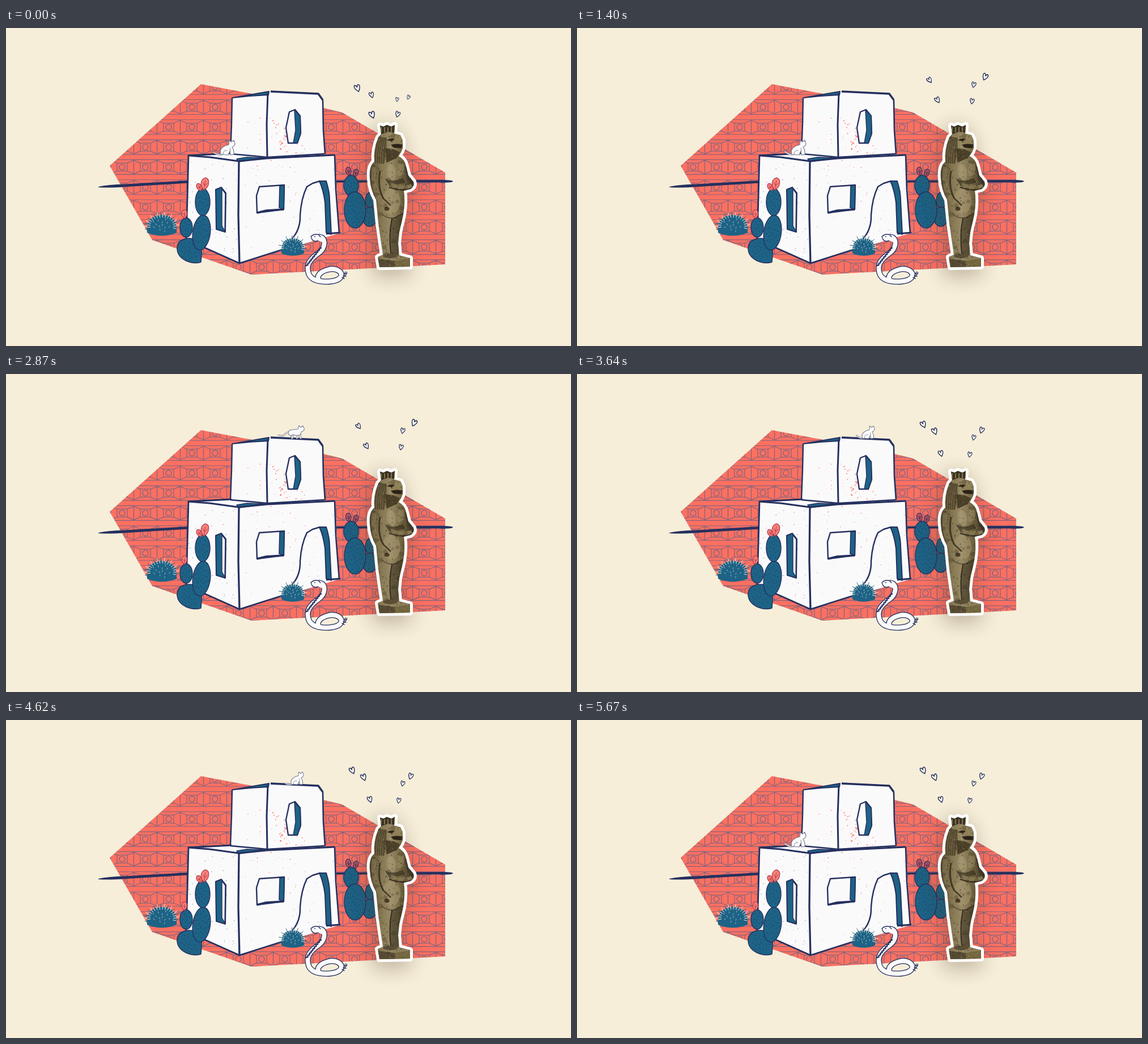
Recreate the animation shown at these times as an HTML page with a canvas. Size 997 by 561 pixels, loop 5740 ms.

```html
<!DOCTYPE html>
<html lang="en">
<head>
<meta charset="utf-8">
<title>House with cat</title>
<style>
html, body { margin: 0; width: 100%; height: 100%; overflow: hidden; background: #f6eed9; }
canvas { display: block; width: 997px; height: 561px; }
</style>
</head>
<body>
<canvas id="stage" width="997" height="561"></canvas>
<script>
const W = 997, H = 561, LOOP = 5740, STEP = 70;
const CREAM = '#f6eed9', CORAL = '#fb7061', NAVY = '#25305f', TEAL = '#1d6386', WHITE = '#fbfafb';
const TAU = Math.PI * 2;
const view = document.getElementById('stage').getContext('2d');
const backdrop = document.createElement('canvas');
backdrop.width = W;
backdrop.height = H;
let g = backdrop.getContext('2d');

let seed = 7;
const rand = () => (seed = (seed * 16807) % 2147483647) / 2147483647;
const between = (a, b) => a + (b - a) * rand();

function shape(d, fill, stroke, width = 1) {
  const path = d instanceof Path2D ? d : new Path2D(d);
  if (fill) { g.fillStyle = fill; g.fill(path); }
  if (stroke) { g.strokeStyle = stroke; g.lineWidth = width; g.stroke(path); }
}
const line = (d, width, color = NAVY) => shape(d, null, color, width);

function oval(x, y, rx, ry, fill, stroke, width, turn = 0) {
  const path = new Path2D();
  path.ellipse(x, y, rx, ry, turn, 0, TAU);
  shape(path, fill, stroke, width);
}

function clipped(d, draw) {
  g.save();
  g.clip(new Path2D(d));
  draw();
  g.restore();
}

function specks(count, x0, y0, x1, y1, color, size) {
  for (let i = 0; i < count; i++) {
    const r = between(0.25, size);
    oval(between(x0, x1), between(y0, y1), r, r, color);
  }
}

function drawPattern() {
  const land = 'M344 99 L460 121 L560 141 L593 149 L775 255 V417 L433 435 L258 374 L183 243 Z';
  shape(land, CORAL);
  clipped(land, () => {
    const ink = 'rgba(74,94,138,.66)';
    for (let row = -1; row < 10; row++) {
      const y = 139.5 + row * 35.3;
      line(`M180 ${y - 13}H780M180 ${y + 13}H780`, 1.1, ink);
      for (let x = 328 - 41 * 4; x < 800; x += 41) {
        line(`M${x - 9} ${y - 7}H${x + 9}V${y + 7}H${x - 9}Z
          M${x + 9} ${y - 7}L${x + 20.5} ${y - 12}L${x + 32} ${y - 7}
          M${x + 9} ${y + 7}L${x + 20.5} ${y + 12}L${x + 32} ${y + 7}
          M${x + 20.5} ${y - 12}V${y + 12}`, 1.25, ink);
        oval(x, y, 5, 5, null, ink, 1.4);
      }
    }
  });
}

function drawHorizon() {
  shape('M163 280 Q180 276 210 275.5 L330 268.5 V273 L215 280 Q180 282.5 163 281 Z', NAVY);
  shape('M575 269 L770 268 Q788 268 789 270.5 Q786 273.5 765 272.5 L575 272.5 Z', NAVY);
}

function drawHouse() {
  const lower = 'M322 225 L398 221 L580 224 L588 362 L412 415 L318 373 Z';
  const upper = 'M399 123 L467 112 L551 116 L559 127 L562 223 L461 229 L396 222 Z';
  shape(lower, WHITE);
  shape(upper, WHITE);
  clipped(lower, () => {
    specks(110, 318, 235, 411, 410, 'rgba(37,48,95,.55)', 0.8);
    specks(60, 415, 240, 585, 400, 'rgba(90,60,95,.5)', 0.75);
    specks(18, 440, 230, 530, 360, CORAL, 0.9);
  });
  specks(60, 466, 150, 528, 225, CORAL, 1);
  specks(18, 484, 190, 497, 221, CORAL, 1.5);
  specks(14, 425, 150, 460, 215, CORAL, 0.8);

  shape('M400 123 L464 112 L463 118 L430 120 Z', TEAL, NAVY, 2);
  line('M467 112 L551 116 L559 127', 3.6);
  line('M559 127 L560 180 L563 222', 2.6);
  line('M399 123 L398 170 L396 222', 2.4);
  line('M462 115 L460 170 L461 227', 3);
  line('M396 222 L430 225 L461 228 L562 222', 2.6);

  shape('M407 231 L425 228 L457 229 L411 236 Z', TEAL, NAVY, 1.5);
  line('M398 221 L322 225 L360 228 L411 235 L460 230 L520 227 L580 224', 3);
  line('M411 235 L410 330 L412 415', 3.3);
  line('M322 225 L320 300 L318 373 L412 415 L500 387', 2.8);
  line('M580 224 L582 285 L588 362', 2.6);

  shape('M370 285 L380 281 L388 291 L387 360 L371 355 Z', TEAL, NAVY, 2);
  shape('M381 284 L387 292 L386 358 L381 349 Z', WHITE, NAVY, 1.4);
  shape('M447 280 L491 277 L490 320 L443 326 L442 296 Z', WHITE, NAVY, 2.4);
  shape('M483 279 L491 277 L490 320 L482 317 Z', TEAL, NAVY, 1.6);
  line('M443 326 L459 322 L490 320', 3.4);
  shape('M500 148 L510 144 L519 155 L520 186 L514 203 L498 203 L494 176 Z', WHITE, NAVY, 2.3);
  shape('M509 145 L519 155 L520 186 L514 203 L507 203 L511 180 Z', TEAL, NAVY, 1.4);
  line('M504 373 Q520 355 519 330 Q521 300 531 280 L541 274 L554 270', 2.5);
  shape('M553 270 L565 270 Q571 289 571 303 L574 364 L565 361 L563 308 Q560 285 553 270 Z', TEAL, NAVY, 2);
  line('M565 363 L590 361', 3);
}

function prickles(x, y, rx, ry) {
  const count = rx * ry / 18;
  for (let i = 0; i < count; i++) {
    const a = i * 2.4, r = Math.sqrt(i / count) * 0.85;
    line(`M${x + Math.cos(a) * rx * r} ${y + Math.sin(a) * ry * r}l1 2`, 0.9);
  }
}

function paddle(x, y, rx, ry, turn = 0) {
  oval(x, y, rx, ry, TEAL, NAVY, 1.4, turn);
  prickles(x, y, rx, ry);
}

function petal(x, y, s, turn, fill = '#fb8277', stroke = '#a8354c') {
  g.save();
  g.translate(x, y);
  g.rotate(turn);
  g.scale(s, s);
  shape('M0 0 C-9 -6 -10 -17 -2 -22 C7 -22 9 -8 0 0 Z', fill, stroke, 1.1 / s);
  line('M0 -2 L-1 -17 M0 -8 L4 -14 M0 -8 L-5 -13', 0.8 / s, stroke);
  g.restore();
}

function urchin(x, y, rx, ry) {
  const body = `M${x - rx} ${y + ry * .65} Q${x - rx * 1.1} ${y - ry} ${x} ${y - ry} Q${x + rx * 1.1} ${y - ry} ${x + rx} ${y + ry * .65} Q${x} ${y + ry * 1.2} ${x - rx} ${y + ry * .65} Z`;
  shape(body, TEAL);
  for (let i = 0; i < 34; i++) {
    const a = Math.PI * (0.92 + 1.16 * i / 33);
    const dx = Math.cos(a), dy = Math.sin(a), r = i % 2 ? 0.78 : 0.98;
    line(`M${x + dx * rx * r} ${y + dy * ry * r}l${dx * 5.5} ${dy * 5.5}`, 1, i % 4 ? '#f7f0e4' : TEAL);
  }
  for (let i = 0; i < 13; i++) {
    const a = i * 2.4, r = 0.65 * Math.sqrt(i / 13);
    line(`M${x + Math.cos(a) * rx * r} ${y + Math.sin(a) * ry * r}l${Math.cos(a) * 2} -3`, 0.8, 'rgba(247,240,228,.75)');
  }
}

function drawPlants() {
  urchin(275, 349, 26, 19);
  shape('M302 390 C301 373 320 368 334 373 C349 379 345 400 344 413 C328 418 303 409 302 390 Z', TEAL, NAVY, 1.4);
  prickles(324, 392, 19, 21);
  paddle(318, 352, 11, 17);
  paddle(345, 361, 15.5, 31, 0.13);
  paddle(347, 307, 13, 24);
  petal(345, 287, 0.65, -0.5);
  petal(349, 286, 1, 0.22);
  petal(315, 336, 0.7, 0.05);

  petal(606, 261, 0.72, -0.15, '#c45561', NAVY);
  petal(615, 263, 0.66, 0.35, '#c45561', NAVY);
  paddle(643, 304, 9, 14);
  paddle(642, 333, 13, 17);
  paddle(609, 278, 13, 18);
  paddle(616, 321, 19, 32);
  urchin(506, 387, 20, 16);
}

function drawSnake() {
  oval(566, 436, 17, 8, CREAM);
  const tail = 'M584 442 Q594 441 600 432';
  const coil = 'M546 370 C565 363 566 386 553 396 C536 408 529 417 534 433 C540 451 575 449 585 444 C601 436 586 421 569 426 C556 429 549 436 551 442';
  g.lineCap = 'round';
  line(tail, 4.5);
  line(tail, 2.2, WHITE);
  line(coil, 10.5);
  line(coil, 7.8, WHITE);
  line('M593 440l4 2M595 437l5 1M597 434l4 -1', 1.4);
  shape('M538 368 Q544 362 552 365 Q558 371 552 374 Q545 379 540 373 Z', WHITE, NAVY, 1.3);
  shape('M548 367 L558 370 V378 L547 373 Z', WHITE);
  oval(545, 368, 0.9, 0.9, NAVY);
  for (let i = 0; i < 9; i++) {
    const x = 556 - i * 2.9, y = 388 + i * 3.7;
    line(`M${x} ${y}l-3.4 1.6`, 2.4);
  }
  g.lineCap = 'butt';
}

function drawStatue() {
  const body = new Path2D('M660 172 L666 174 L672 171 L680 174 L686 171 L685 186 L696 189 L700 198 L700 212 Q698 219 693 226 Q704 232 706 244 L710 260 L719 271 Q722 279 714 284 L702 287 Q705 305 701 330 L694 360 L692 380 L694 401 L713 406 V421 L659 422 L656 404 L665 400 L662 380 L657 345 L653 303 Q643 286 642 266 Q640 243 650 236 Q648 214 657 193 L662 187 Z');
  g.save();
  g.shadowColor = 'rgba(75,60,40,.3)';
  g.shadowBlur = 34;
  g.shadowOffsetX = -5;
  g.shadowOffsetY = 9;
  shape(body, '#fff', '#fff', 10);
  g.restore();

  const tone = g.createLinearGradient(642, 0, 716, 0);
  ['#4c432f', '#83754f', '#988a66', '#71643f', '#40372a'].forEach((c, i) => tone.addColorStop(i / 4, c));
  g.save();
  g.clip(body);
  g.fillStyle = tone;
  g.fillRect(630, 165, 95, 262);

  // crown, mane and snout
  shape('M655 165 H690 V186 L674 183 L657 189 Z', '#3a3222');
  for (let x = 662; x < 687; x += 6) line(`M${x} 175 V184`, 2, '#83754f');
  shape('M657 191 Q647 215 649 238 L667 240 Q674 220 671 194 Z', '#695c3d');
  for (let i = 0; i < 5; i++) line(`M${659 + i * 3} 193 Q${650 + i * 4} 215 ${652 + i * 3.6} 239`, 0.8, '#392f1f');
  shape('M673 192 Q684 187 696 190 L701 199 L698 205 L680 203 Z', '#8f8058');
  shape('M672 198 Q679 193 686 196 L681 200 Z', '#2e2618');
  shape('M679 206 Q690 203 701 206 L697 212 L684 211 Z', '#2b2217');
  shape('M670 212 L684 214 L695 219 L690 229 L671 238 Z', '#4b4029');

  // torso and arms
  oval(680, 254, 8, 14, 'rgba(174,160,118,.5)', null, 1, -0.2);
  oval(696, 250, 6, 12, 'rgba(165,149,108,.45)', null, 1, 0.2);
  shape('M668 265 Q684 274 700 264 L704 273 L677 279 Z', 'rgba(48,39,24,.6)');
  oval(680, 306, 16, 22, 'rgba(170,155,116,.45)');
  line('M660 252 Q655 282 666 301 L679 313', 3, 'rgba(45,36,23,.75)');
  line('M650 246 Q646 276 658 302 L672 317', 8, 'rgba(137,121,82,.6)');
  line('M705 244 L709 264 L716 274', 2.2, '#3e3424');
  line('M716 278 Q702 285 679 276', 6, '#83754f');
  line('M715 284 Q701 289 676 281', 2, 'rgba(40,32,20,.85)');
  oval(672, 319, 4.5, 3.5, '#4c3b27');

  // legs and plinth
  line('M663 328 Q680 343 700 327', 1.4, 'rgba(56,46,29,.7)');
  shape('M682 336 L701 325 L692 401 L679 399 Q675 365 682 336 Z', 'rgba(46,38,24,.5)');
  line('M681 336 Q675 365 679 398', 2, '#362d1f');
  shape('M655 402 L679 399 L714 406 L690 411 Z', '#8e7f5a');
  oval(678, 402, 13, 4, '#5b4f38');
  shape('M656 407 L686 411 V424 H655 Z', '#574b34');
  shape('M686 411 L715 406 V424 H686 Z', '#74673f');

  specks(45, 642, 190, 718, 420, 'rgba(48,39,25,.26)', 5);
  specks(260, 642, 188, 720, 422, 'rgba(37,30,20,.62)', 1.15);
  specks(140, 645, 190, 716, 420, 'rgba(184,171,137,.5)', 1.1);
  specks(24, 652, 230, 702, 310, 'rgba(110,124,135,.65)', 1.2);
  g.restore();
}

// x, y, turn, size for each of three hearts poses
const HEARTS = [
  [[620, 106, -.35, 1.1], [645, 118, -.35, .9], [690, 126, .15, .65], [710, 122, .4, .65], [646, 153, -.4, 1.1], [691, 152, .3, .9]],
  [[611, 89, -.45, 1.05], [631, 101, -.4, 1.05], [642, 140, -.3, .95], [693, 142, .15, .82], [700, 112, .2, .82], [714, 99, .3, .95]],
  [[622, 92, -.65, .9], [636, 127, -.55, .95], [697, 129, .15, .85], [700, 100, .2, .85], [720, 86, .4, 1.05]]
];

function drawHearts(t) {
  const pose = Math.floor((t % 490) / (490 / 3));
  for (const [x, y, turn, size] of HEARTS[pose]) {
    g.save();
    g.translate(x, y);
    g.rotate(turn);
    g.scale(size * .9, size);
    shape('M0 6 C-4 1 -6 -2 -4 -5 C-2 -6 0 -4 0 -1.5 C1 -5 4 -6 5 -3 C5.5 0 3 3 0 6 Z', 'rgba(255,255,255,.35)', NAVY, 1.5);
    g.restore();
  }
}

const CAT_INK = '#777b91';

function sittingCat(t) {
  const wag = 2 * Math.sin(t / 330);
  const tail = `M-8 -2 Q-16 1 -24 ${-4 + wag}`;
  line(tail, 3, CAT_INK);
  line(tail, 1.2, WHITE);
  shape('M-12 -1 Q-15 -9 -8 -14 Q-4 -17 2 -18 L3 -26 L7 -23 L11 -26 L13 -20 Q13 -16 8 -14 Q12 -8 11 -1 L5 0 L4 -7 L1 0 Z', WHITE, CAT_INK, 1.2);
  line('M-8 -1 Q-8 -9 -1 -8 M4 -12 L5 -7', 0.9, CAT_INK);
}

function walkingCat(t) {
  const swing = 3.5 * Math.sin(t / 75);
  const tail = 'M-8 -14 Q-15 -13 -19 -8 Q-24 -4 -31 -7';
  line(tail, 3, CAT_INK);
  line(tail, 1.3, WHITE);
  for (const [x, dir] of [[-6, 1], [-2, -1], [8, -1], [12, 1]]) {
    const leg = `M${x} -10 L${x + swing * dir * .5} -5 L${x + swing * dir} -1`;
    line(leg, 4, CAT_INK);
    line(leg, 2.1, WHITE);
  }
  shape('M-11 -9 Q-13 -18 -3 -18 L8 -19 L10 -26 L14 -23 L18 -26 L21 -20 Q21 -15 15 -14 L13 -8 Q5 -5 -2 -8 Q-7 -4 -11 -9 Z', WHITE, CAT_INK, 1.2);
}

function route(p) {
  const lerp = (a, b, u) => a + (b - a) * u;
  if (p < 0.42) return [lerp(391, 437, p / 0.42), lerp(224, 228, p / 0.42)];
  if (p < 0.7) {
    const u = (p - 0.42) / 0.28;
    return [lerp(437, 492, u), lerp(228, 114, u) - 60 * u * (1 - u)];
  }
  return [lerp(492, 514, (p - 0.7) / 0.3), 114];
}

function drawCat(t) {
  const up = (t - 1960) / 990, down = (t - 4760) / 840;
  const walking = (up > 0 && up < 1) || (down > 0 && down < 1);
  const p = Math.max(0, Math.min(1, down > 0 ? 1 - down : up));
  const [x, y] = route(p);
  const size = 1 - 0.14 * p;
  g.save();
  g.translate(x, y);
  g.scale(walking && down > 0 ? -size : size, size);
  walking ? walkingCat(t) : sittingCat(t);
  g.restore();
}

g.fillStyle = CREAM;
g.fillRect(0, 0, W, H);
g.lineJoin = 'round';
[drawPattern, drawHorizon, drawHouse, drawPlants, drawSnake, drawStatue].forEach(draw => draw());
g = view;
g.lineJoin = g.lineCap = 'round';

const start = performance.now();
function frame(now) {
  const t = Math.floor((Math.max(0, now - start) % LOOP) / STEP) * STEP;
  g.drawImage(backdrop, 0, 0);
  drawCat(t);
  drawHearts(t);
  requestAnimationFrame(frame);
}
frame(start);
</script>
</body>
</html>
```
